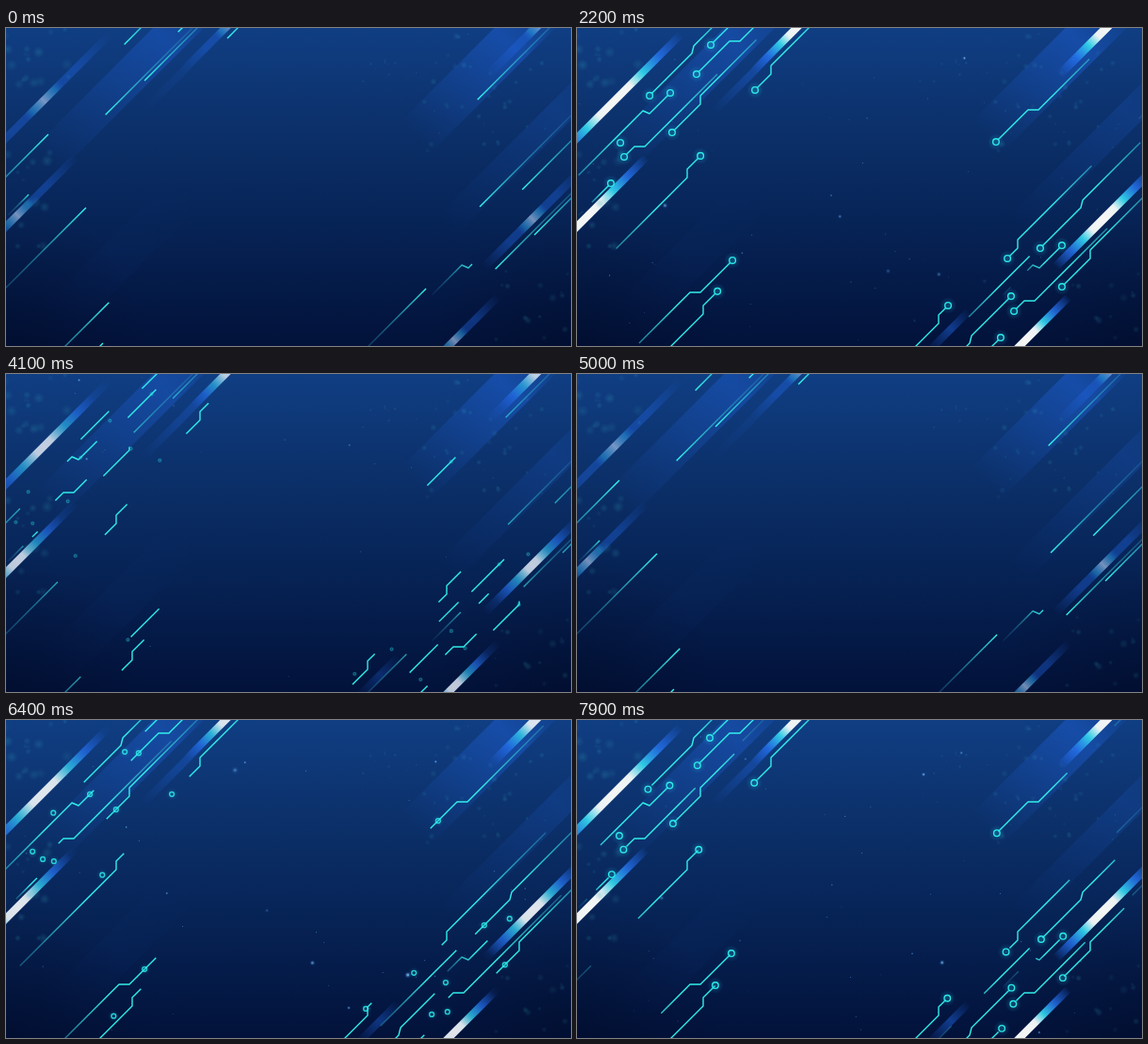
Animation of 600 by 338 pixels, one loop 8000 ms. Source, as an HTML page with a canvas:

```html
<!DOCTYPE html>
<html lang="en">
<head>
<meta charset="utf-8">
<title>Circuit light background</title>
<style>
html, body { margin: 0; width: 100%; height: 100%; overflow: hidden; background: #072253; }
canvas { display: block; width: 100vw; height: 100vh; }
</style>
</head>
<body>
<canvas id="stage" width="600" height="338"></canvas>
<script>
const W = 600, H = 338, LOOP = 8000, CYCLE = 5000;
const LEAD = 0.7;     // how far a line's head runs ahead of its tail
const LENGTH = 236;   // usual length of a line
const RING = 3.4;
const ctx = document.getElementById('stage').getContext('2d');
const clamp = (v, a = 0, b = 1) => Math.min(b, Math.max(a, v));

function randomizer(seed) {
  return () => {
    seed = (seed * 1664525 + 1013904223) >>> 0;
    return seed / 4294967296;
  };
}
const rand = randomizer(29);
const spread = size => (rand() * 2 - 1) * size;

const wires = [], nodes = [];

// The sidestep each kind of line takes, seen when leaving its ring up and right
const JOGS = { rise: [0, -9], lean: [2, -8], flat: [11, 0], hook: [7, 3] };
const UP = 1, DOWN = -1;

// A diagonal line that ends at (x, y), with an optional jog after `run` pixels
function wire(x, y, dir, run, jog, full = LENGTH) {
  const inset = dir * RING * Math.SQRT1_2;
  const pts = [[x + inset, y - inset]];
  let rest = full, ex = x + inset, ey = y - inset;
  if (jog) {
    const [jx, jy] = JOGS[jog];
    const bx = x + dir * run, by = y - dir * run;
    ex = bx + dir * jx;
    ey = by + dir * jy;
    pts.push([bx, by], [ex, ey]);
    rest -= run * Math.SQRT2 - RING + Math.hypot(jx, jy);
  }
  const reach = dir * rest * Math.SQRT1_2;
  pts.push([ex + reach, ey - reach]);
  pts.reverse();
  const path = new Path2D();
  pts.forEach(([px, py]) => path.lineTo(px, py));
  const ink = ctx.createLinearGradient(...pts[0], x, y);
  ink.addColorStop(0, 'rgba(52,140,190,.1)');
  ink.addColorStop(0.4, 'rgba(48,190,210,.55)');
  ink.addColorStop(0.68, '#34f2ec');
  ink.addColorStop(1, '#2eeae8');
  wires.push({ path, full, ink });
}

// A ring that slides diagonally by `slide` away from its resting place
const node = (x, y, slide) => nodes.push({ x, y, slide });

function circuit(x, y, slide, dir, run, jog, full) {
  node(x, y, slide);
  wire(x, y, dir, run, jog, full);
}

circuit(142, 18, -16, UP);
circuit(77, 72, -27, UP, 45, 'lean');
circuit(127, 49, 14, UP, 35, 'flat');
circuit(99, 69, -10, DOWN, 22, 'hook');
circuit(101, 111, 16, UP, 30, 'rise');
circuit(50, 137, -11, UP, 11, 'flat');
circuit(36, 165, 15, DOWN, 0, null, 45);
circuit(131, 136, -29, DOWN, 14, 'rise');
circuit(189, 66, -13, UP, 17, 'rise');
circuit(165, 247, -18, DOWN, 34, 'flat');
circuit(149, 280, -35, DOWN, 15, 'rise');
circuit(394, 295, -12, DOWN, 10, 'rise');
circuit(450, 329, 19, DOWN);
circuit(461, 285, 6, DOWN, 42, 'lean');
circuit(464, 301, -12, UP, 11, 'flat');
circuit(515, 275, 15, UP, 30, 'rise');
circuit(457, 245, -24, UP, 11, 'rise');
circuit(492, 234, 16, UP, 43, 'lean', 272);
circuit(515, 231, 20, DOWN, 24, 'hook', 83);
circuit(445, 121, 14, UP, 34, 'flat');
node(46, 122, -18);
wire(483, 240, DOWN, 0, null, 163);

// Paints along the 45 degree axis through (x, y)
function diagonal(x, y, half, width, stops) {
  ctx.save();
  ctx.translate(x, y);
  ctx.rotate(-Math.PI / 4);
  const g = ctx.createLinearGradient(-half, 0, half, 0);
  stops.forEach(([at, color]) => g.addColorStop(at, color));
  ctx.fillStyle = g;
  ctx.fillRect(-half, -width / 2, half * 2, width);
  ctx.restore();
}

const blue = alpha => `rgba(32,100,225,${alpha})`;

const band = (x, y, half, width, alpha, peak = 0.7) =>
  diagonal(x, y, half, width, [[0, blue(0)], [peak, blue(alpha)], [1, blue(0)]]);

// A light bar whose white heart grows and brightens with power
function beam(x, y, size, width, power) {
  const grow = 0.4 + 0.6 * power;
  const mirrored = list => list.flatMap(([d, c]) => [[0.5 - d / 2, c], [0.5 + d / 2, c]]);
  diagonal(x, y, size, width, mirrored([[1, blue(0)], [0.5, blue(0.4)], [0, blue(0.4)]]));
  diagonal(x, y, size * grow, width, mirrored([
    [1, blue(0)],
    [0.68, `rgba(38,115,240,${0.75 * power})`],
    [0.42, `rgba(50,212,232,${0.25 + 0.7 * power * power})`],
    [0.24 * power, `rgba(238,244,244,${0.45 + 0.55 * power})`],
    [0, `rgba(248,248,246,${0.45 + 0.55 * power})`]
  ]));
}

// Soft resting motes
const motes = [];
function cluster(x, y, sx, sy, count, size) {
  for (let i = 0; i < count; i++) {
    motes.push({
      x: x + spread(sx), y: y + spread(sy),
      r: size * (0.5 + rand()), a: 0.12 + rand() * 0.14, turn: rand() * 6.28
    });
  }
}
cluster(32, 32, 36, 34, 17, 4.5);
cluster(22, 175, 26, 65, 16, 4.5);
cluster(510, 70, 68, 65, 36, 2.6);
cluster(565, 300, 48, 42, 20, 3.4);
cluster(405, 46, 32, 14, 10, 1.3);

// Drifting sparks, mostly tiny
const sparks = Array.from({ length: 90 }, () => ({
  x: rand() * W, y: rand() * H, dx: spread(8), dy: spread(8),
  at: 1000 + rand() * 3000, r: 0.45 + 1.8 * Math.pow(rand(), 6), a: 0.25 + rand() * 0.4
}));

function disc(x, y, r, color) {
  ctx.fillStyle = color;
  ctx.beginPath();
  ctx.arc(x, y, r, 0, Math.PI * 2);
  ctx.fill();
}

function halo(x, y, r, rgb, alpha) {
  const g = ctx.createRadialGradient(x, y, 0, x, y, r);
  g.addColorStop(0, `rgba(${rgb},${alpha})`);
  g.addColorStop(0.45, `rgba(${rgb},${alpha * 0.55})`);
  g.addColorStop(1, `rgba(${rgb},0)`);
  disc(x, y, r, g);
}

function backdrop(power) {
  const g = ctx.createLinearGradient(0, 0, 0, H);
  g.addColorStop(0, '#103e83');
  g.addColorStop(0.3, '#0c316b');
  g.addColorStop(0.6, '#072457');
  g.addColorStop(1, '#02123a');
  ctx.fillStyle = g;
  ctx.fillRect(0, 0, W, H);
  for (const x of [0, W]) {
    const shade = ctx.createRadialGradient(x, H, 0, x, H, 150);
    shade.addColorStop(0, 'rgba(0,6,28,.3)');
    shade.addColorStop(1, 'rgba(0,6,28,0)');
    ctx.fillStyle = shade;
    ctx.fillRect(0, 0, W, H);
  }
  band(133, 50, 125, 38, 0.35);
  band(506, 45, 100, 46, 0.4);
  band(553, 125, 120, 28, 0.18);
  band(120, 245, 100, 42, 0.03, 0.5);
  band(184, 50, 55, 8, 0.1 + 0.25 * power, 0.5);
  band(395, 322, 30, 8, 0.5 * power, 0.55);
}

function drawWire({ path, full, ink }, from, to) {
  if (to <= from) return;
  ctx.strokeStyle = ink;
  ctx.setLineDash([(to - from) * full, 2000]);
  ctx.lineDashOffset = -from * full;
  ctx.stroke(path);
}

function drawCircuits(phase, away) {
  const tail = phase / CYCLE;
  ctx.lineWidth = 1.4;
  ctx.lineJoin = 'round';
  for (const w of wires) {
    drawWire(w, tail, Math.min(1, tail + LEAD));
    drawWire(w, 0, tail + LEAD - 1);
  }
  ctx.setLineDash([]);
  const near = 1 - away, r = RING * Math.pow(near, 0.7);
  if (r < 0.1) return;
  for (const n of nodes) {
    const shift = n.slide * (away - 0.03) / 0.36;
    const x = n.x + shift, y = n.y - shift;
    halo(x, y, r * 2.7, '30,190,230', 0.32 * near);
    ctx.strokeStyle = `rgba(44,235,232,${Math.min(1, near * 1.4)})`;
    ctx.beginPath();
    ctx.arc(x, y, r, 0, Math.PI * 2);
    ctx.stroke();
  }
}

function drawSparks(phase) {
  for (const m of motes) {
    const pulse = 0.85 + 0.15 * Math.sin(phase / CYCLE * Math.PI * 2 + m.turn);
    halo(m.x, m.y, m.r, '50,165,190', m.a * pulse);
  }
  for (const s of sparks) {
    const life = (phase - s.at) / 900;
    const alpha = s.a * clamp(1 - life * life);
    if (!alpha) continue;
    const x = s.x + s.dx * life, y = s.y + s.dy * life;
    halo(x, y, s.r * 2, '70,150,240', alpha);
    disc(x, y, s.r * 0.8, `rgba(140,200,240,${alpha})`);
  }
}

function draw(time) {
  const phase = time % CYCLE;
  const s = 1 - Math.abs(phase / (CYCLE / 2) - 1);
  const away = s < 0.5 ? 1 - 2 * s * s : 2 * (1 - s) * (1 - s);
  const power = Math.pow(1 - away, 0.4);
  backdrop(power);
  beam(40, 77, 100, 8, power);
  beam(12, 199, 88, 8, power);
  beam(237, -4, 72, 8, power);
  beam(566, -4, 76, 9, power);
  beam(559, 203, 72, 9, power);
  beam(476, 332, 66, 8, power);
  drawSparks(phase);
  drawCircuits(phase, away);
}

const start = performance.now();
function tick() {
  draw((performance.now() - start) % LOOP);
  requestAnimationFrame(tick);
}
tick();
</script>
</body>
</html>
```
